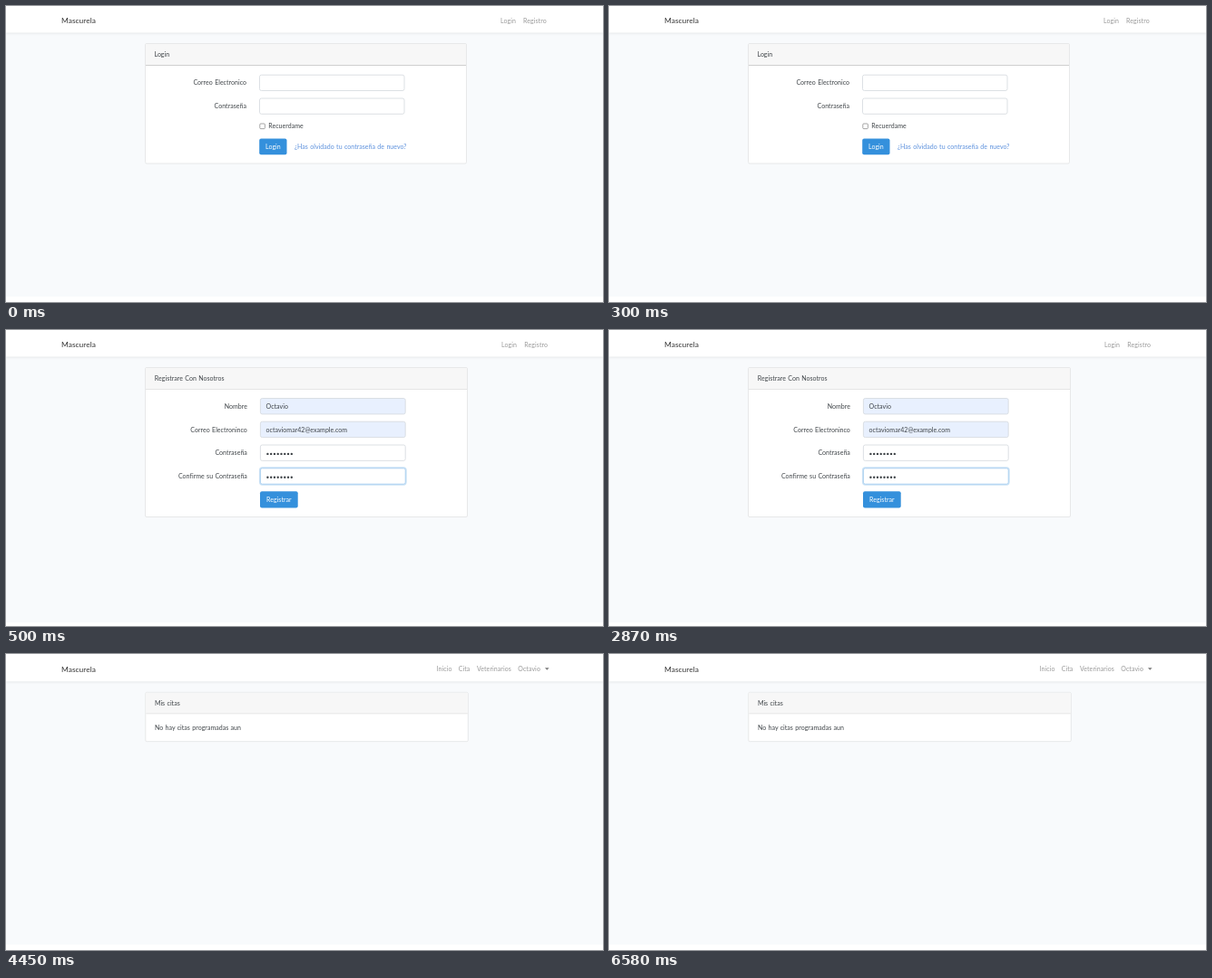
An HTML page for the animation above (8 s loop, 658 px wide and 327 px high).

```html
<!DOCTYPE html>
<html lang="es">
<head>
<meta charset="utf-8">
<title>Acceso y registro</title>
<style>
  html, body { margin: 0; width: 100%; height: 100%; overflow: hidden; background: #fff; }
  svg { display: block; width: 658px; height: 327px; }
  text {
    font: 7px Lato, "Open Sans", sans-serif;
    letter-spacing: .04px;
    word-spacing: .5px;
    fill: #3f4448;
  }
  .brand { font-size: 8.4px; fill: #333; }
  .nav { fill: #999; letter-spacing: .08px; }
  .label { text-anchor: end; }
  .link { fill: #5a8fdc; }
  .on-button { fill: #fff; text-anchor: middle; }

  .back { fill: #f8fafc; }
  .bar { fill: #fff; filter: drop-shadow(0 1px 1px rgba(0, 0, 0, .08)); }
  .card { fill: #fff; stroke: #e7e8e9; }
  .head { fill: #f7f7f7; }
  .rule { stroke: #e5e5e5; }
  .rule.strong { stroke: #cfcfcf; }
  .input { fill: #fff; stroke: #d3d8dd; stroke-width: .8; }
  .filled { fill: #e8f0fe; }
  .focus { stroke: #a1cbef; }
  .glow { fill: none; stroke: #3490dc; stroke-opacity: .25; stroke-width: 2.6; }
  .check { fill: #fff; stroke: #808080; stroke-width: .7; }
  .button { fill: #3490dc; }
  .dots { stroke: #3f4448; stroke-width: 2.4; stroke-linecap: round; stroke-dasharray: 0 3.77; }

  .page { visibility: hidden; animation: 8s step-end infinite; }
  .login { animation-name: login; }
  .register { animation-name: register; }
  .home { animation-name: home; }
  @keyframes login { 0% { visibility: visible } 6.25%, 100% { visibility: hidden } }
  @keyframes register { 0% { visibility: hidden } 6.25% { visibility: visible } 55.625%, 100% { visibility: hidden } }
  @keyframes home { 0% { visibility: hidden } 55.625%, 100% { visibility: visible } }
</style>
</head>
<body>
<svg viewBox="0 0 658 327">
  <g class="page login">
    <rect class="back" width="658" height="321"/>
    <rect class="bar" width="658" height="29.5"/>
    <text class="brand" x="61" y="19.4">Mascurela</text>
    <text class="nav" x="545" y="18.7">Login</text>
    <text class="nav" x="570" y="18.7">Registro</text>

    <rect class="card" x="153.5" y="41.5" width="354" height="132.5" rx="1.5"/>
    <rect class="head" x="154" y="42" width="353" height="23"/>
    <path class="rule strong" d="M154 65.5H507"/>
    <text x="163.5" y="55.6">Login</text>

    <text class="label" x="265" y="87.3">Correo Electronico</text>
    <rect class="input" x="279.5" y="76.2" width="159.5" height="17.3" rx="2"/>
    <text class="label" x="265" y="113">Contraseña</text>
    <rect class="input" x="279.5" y="102" width="159.5" height="17.3" rx="2"/>

    <rect class="check" x="279.8" y="130" width="5.6" height="5.6" rx="1"/>
    <text x="289.3" y="135.3">Recuerdame</text>
    <rect class="button" x="279.2" y="146.4" width="30.3" height="17.8" rx="2"/>
    <text class="on-button" x="294.4" y="157.8">Login</text>
    <text class="link" x="318" y="157.8">¿Has olvidado tu contraseña de nuevo?</text>
  </g>

  <g class="page register">
    <rect class="back" width="658" height="323"/>
    <rect class="bar" width="658" height="29.5"/>
    <text class="brand" x="61" y="19.4">Mascurela</text>
    <text class="nav" x="546" y="18.7">Login</text>
    <text class="nav" x="571.3" y="18.7">Registro</text>

    <rect class="card" x="153.5" y="41.5" width="355" height="165" rx="1.5"/>
    <rect class="head" x="154" y="42" width="354" height="23"/>
    <path class="rule" d="M154 65.5H508"/>
    <text x="163.8" y="55.7">Registrare Con Nosotros</text>

    <text class="label" x="265.9" y="86.7">Nombre</text>
    <rect class="input filled" x="280.4" y="75.5" width="159.8" height="17.4" rx="2"/>
    <text x="286.6" y="87">Octavio</text>

    <text class="label" x="265.9" y="112.5">Correo Electroninco</text>
    <rect class="input filled" x="280.4" y="101.2" width="159.8" height="17.4" rx="2"/>
    <text x="286.6" y="112.8">octaviomar42@example.com</text>

    <text class="label" x="265.9" y="138.2">Contraseña</text>
    <rect class="input" x="280.4" y="127" width="159.8" height="17.4" rx="2"/>
    <path class="dots" d="M288.4 136.9h26.5"/>

    <text class="label" x="265.9" y="164">Confirme su Contraseña</text>
    <rect class="glow" x="280.2" y="152.6" width="160.2" height="17.8" rx="2.3"/>
    <rect class="input focus" x="280.4" y="152.8" width="159.8" height="17.4" rx="2"/>
    <path class="dots" d="M288.4 162.7h26.5"/>

    <rect class="button" x="280" y="178.2" width="41.7" height="18.2" rx="2"/>
    <text class="on-button" x="300.8" y="189.8">Registrar</text>
  </g>

  <g class="page home">
    <rect class="back" width="658" height="321"/>
    <rect class="bar" width="658" height="30.3"/>
    <text class="brand" x="61" y="19.9">Mascurela</text>
    <text class="nav" x="474.5" y="19.2">Inicio</text>
    <text class="nav" x="498.7" y="19.2">Cita</text>
    <text class="nav" x="519" y="19.2">Veterinarios</text>
    <text class="nav" x="564.3" y="19.2">Octavio</text>
    <path d="M594 15.3h4.6l-2.3 2.4z" fill="#777"/>

    <rect class="card" x="153.8" y="42.3" width="355.5" height="54.4" rx="1.5"/>
    <rect class="head" x="154.3" y="42.8" width="354.5" height="22.7"/>
    <path class="rule" d="M154.3 65.8H508.8"/>
    <text x="163.9" y="56.5">Mis citas</text>
    <text x="163.9" y="83.8">No hay citas programadas aun</text>
  </g>
</svg>
</body>
</html>
```
